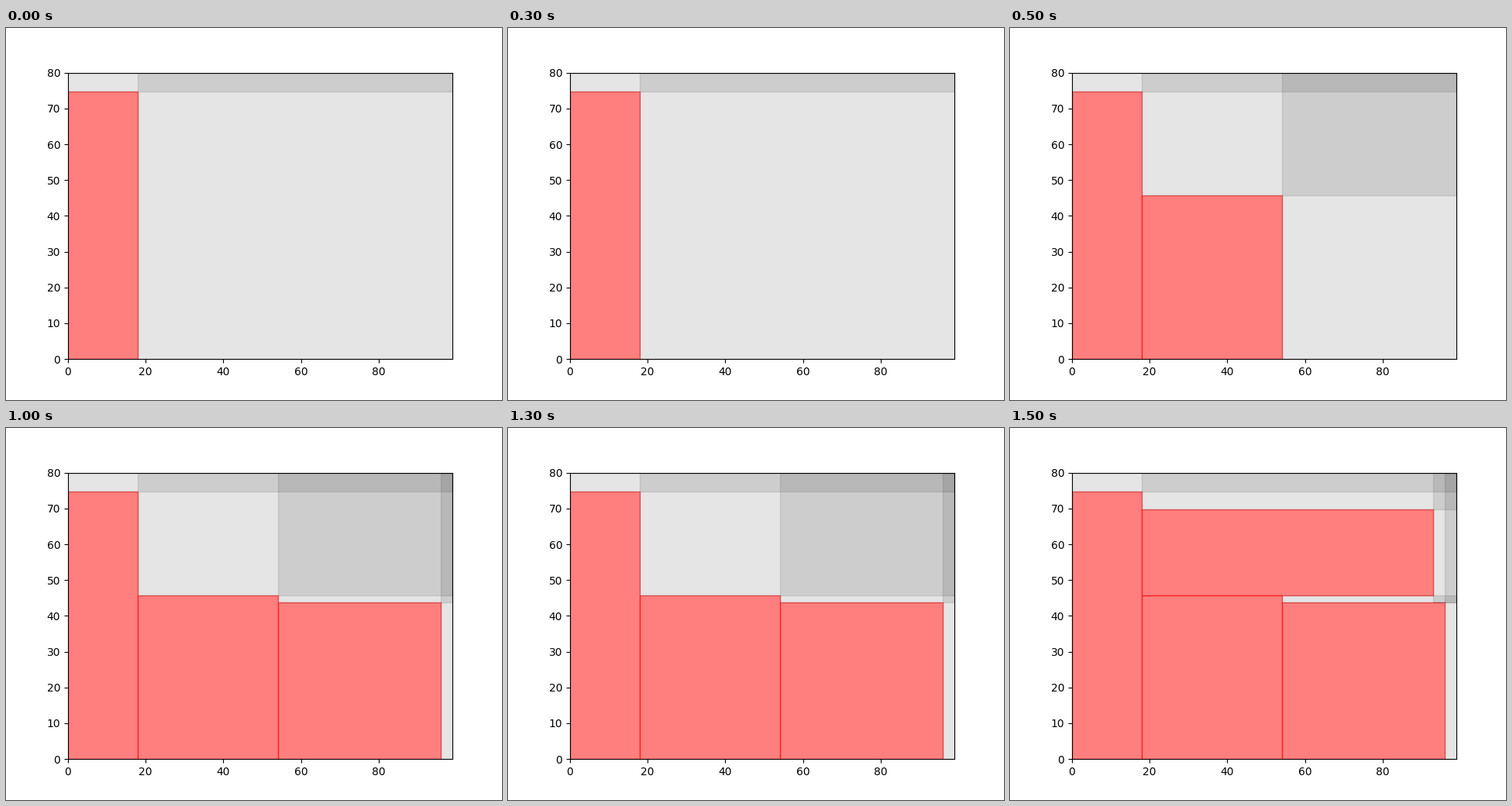
A matplotlib script for the animation above (2000 ms loop, 640 by 480 pixels).

```python
import matplotlib.pyplot as plt
from matplotlib.animation import FuncAnimation
from matplotlib.patches import Rectangle

W, H = 99, 80
A, B, C, D = 74.7, 45.7, 43.7, 69.7  # top edges of the packed items

# Boxes are (left, bottom, right, top).
ITEMS = [(0, 0, 18, A), (18, 0, 54, B), (54, 0, 96, C), (18, B, 93, D)]

# Maximal free rectangles after each placement.
TOP = (0, A, W, H)
FREE = [
    [TOP, (18, 0, W, H)],
    [TOP, (18, B, W, H), (54, 0, W, H)],
    [TOP, (18, B, W, H), (54, C, W, H), (96, 0, W, H)],
    [TOP, (18, D, W, H), (54, C, W, B), (93, C, W, H), (96, 0, W, H)],
]

fig, ax = plt.subplots(figsize=(6.4, 4.8), dpi=100)
ax.set_xlim(0, W)
ax.set_ylim(0, H)


def add_box(box, color, alpha):
    x0, y0, x1, y1 = box
    ax.add_patch(Rectangle((x0, y0), x1 - x0, y1 - y0, color=color, alpha=alpha))


def draw(step):
    for patch in list(ax.patches):
        patch.remove()
    for box in ITEMS[:step + 1]:
        add_box(box, "red", 0.5)
    for box in FREE[step]:
        add_box(box, "black", 0.1)
    return ax.patches


anim = FuncAnimation(fig, draw, frames=len(ITEMS), interval=500,
                     repeat=True, repeat_delay=0, blit=False)
plt.show()
```
